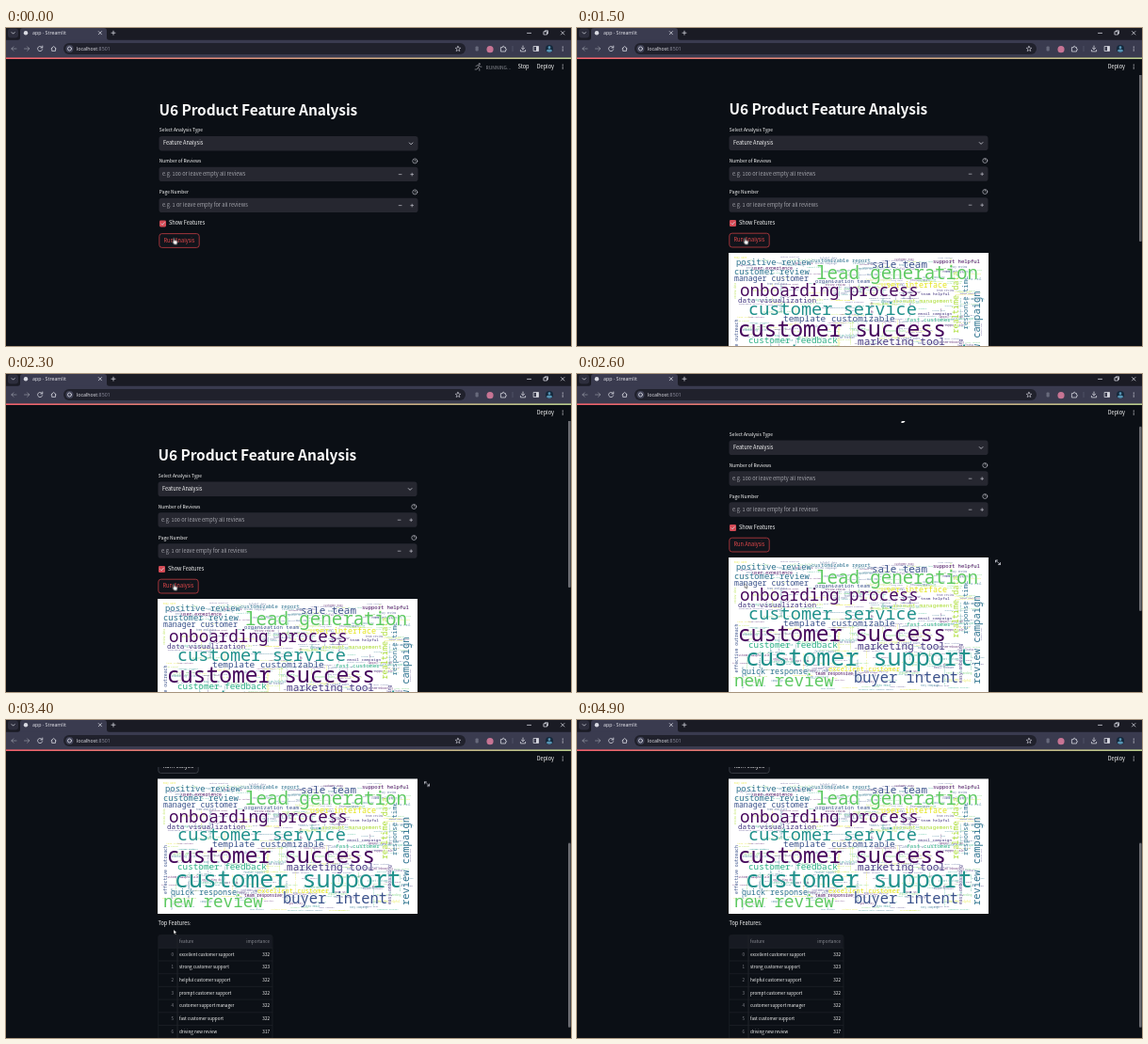
An HTML page that plays this animation: 600x338 px, repeating every 5 s.

```html
<!DOCTYPE html>
<html lang="en">
<head>
<meta charset="utf-8">
<title>Feature Analysis</title>
<style>
html, body { margin: 0; width: 100%; height: 100%; overflow: hidden; background: #0b0f15; }
svg { display: block; width: 600px; height: 338px; }
text { dominant-baseline: central; white-space: pre; }
.app { font-family: "Noto Sans CJK JP", "Noto Sans CJK SC", "Open Sans", sans-serif; fill: #fafafa; }
.ui { font: 5.3px "Open Sans", sans-serif; fill: #e8e8ee; }
.cloud { font-family: "Noto Sans Mono", "DejaVu Sans Mono", monospace; }
.big { stroke: #fff; stroke-width: 1px; paint-order: stroke; }
.title, .label, .body, .cell { transform: translateY(-.09em); }
.title { font-size: 15.45px; font-weight: 700; letter-spacing: -.005em; }
.label { font-size: 4.95px; font-weight: 500; }
.body { font-size: 5.6px; font-weight: 500; }
.cell { font-size: 4.6px; font-weight: 500; }
.line { fill: none; stroke: #d5d6df; stroke-width: .8; stroke-linecap: round; stroke-linejoin: round; }
.dim { opacity: .5; }
.mid { text-anchor: middle; }
.end { text-anchor: end; }

#stage, #shift, .anim { animation: 5s step-end -20ms infinite; }
#stage { animation-name: scroll; }
#page { transform: translateY(calc(var(--s) * -1px)); }
#thumb { transform: translateY(calc(var(--s) * .565px)); }
#shift { animation-name: shift; }
#late, #bar { animation-name: late; }
#bar1, #status { animation-name: running; }
#bar2 { animation-name: done; }
#pose1 { animation-name: pose1; }
#pose2 { animation-name: pose2; }
#hand { animation-name: hand; }
#arrow, #expand { animation-name: arrow; }
#btn { animation-name: btn; }
#btnText { animation-name: btnText; }

/* --s is the scroll distance in pixels */
@keyframes scroll {
  0%, 48% { --s: 0; }
  50% { --s: 12; }
  52% { --s: 44; }
  54% { --s: 80; }
  56% { --s: 113; }
  58% { --s: 140; }
  60% { --s: 159; }
  62% { --s: 170; }
  64% { --s: 175; }
  66%, 100% { --s: 176.5; }
}
@keyframes shift { 0% { transform: translate(1px, .4px); } 14%, 100% { transform: none; } }
@keyframes late { 0% { visibility: hidden; } 14%, 100% { visibility: visible; } }
@keyframes running { 0% { opacity: 1; } 28%, 100% { opacity: 0; } }
@keyframes done { 0% { opacity: 0; } 28%, 100% { opacity: 1; } }
@keyframes pose1 { 0%, 8%, 16%, 24% { opacity: 1; } 4%, 12%, 18%, 100% { opacity: 0; } }
@keyframes pose2 { 0%, 8%, 16%, 24% { opacity: 0; } 4%, 12%, 18%, 100% { opacity: 1; } }
@keyframes hand { 0% { opacity: 1; } 50%, 100% { opacity: 0; } }
@keyframes arrow { 0% { opacity: 0; } 50% { opacity: 1; } 76%, 100% { opacity: 0; } }
@keyframes btn { 0% { stroke: #c23d43; } 64%, 100% { stroke: #41444c; } }
@keyframes btnText { 0% { fill: #e5484b; } 64%, 100% { fill: #fafafa; } }
</style>
</head>
<body>
<svg id="stage" viewBox="0 0 600 338">
  <defs>
    <linearGradient id="deco"><stop stop-color="#f0606a"/><stop offset="1" stop-color="#b9cc8c"/></linearGradient>
    <clipPath id="view"><rect y="50" width="600" height="288"/></clipPath>
  </defs>
  <rect width="600" height="338" fill="#0b0f15"/>

  <g clip-path="url(#view)"><g id="page"><g id="shift" class="app">
    <text class="title" x="161.5" y="86.8">U6 Product Feature Analysis</text>
    <g id="form"></g>
    <rect x="162" y="204" width="7" height="7" rx="1.3" fill="#d44a55"/>
    <path class="line" d="M163.8 207.6l1.3 1.3 2.3-2.7"/>
    <text class="body" x="172" y="207.5">Show Features</text>
    <rect id="btn" class="anim" x="161.8" y="218.2" width="42.4" height="14.8" rx="2.8" fill="#11141b" stroke-width=".8"/>
    <text id="btnText" class="anim body mid" x="183" y="225.7">Run Analysis</text>
    <g id="late" class="anim">
      <rect x="161" y="239" width="276" height="143.5" fill="#fff"/>
      <g id="cloud" class="cloud" transform="translate(0 176.5)"></g>
      <path id="expand" class="anim line" d="M446.5 242h-2v2M447.5 246.6h2v-2M444.7 242.2l1.8 1.8M449.3 246.4l-1.8-1.8"/>
      <text class="body" x="161.5" y="393.5">Top Features:</text>
      <g id="table"></g>
    </g>
  </g></g></g>

  <g class="ui">
    <g id="status" class="anim">
      <g class="line" style="stroke:#8d8f96">
        <g id="pose1" class="anim"><circle cx="502.6" cy="38.2" r=".7"/><path d="M499 40.5l2-1 1.6.5-1.3 2.3 1.5 1v2M501.3 42.3l-1.2 1.7h-2M502.6 40l1 1.2h1.4"/></g>
        <g id="pose2" class="anim"><circle cx="500.6" cy="38.2" r=".7"/><circle cx="501" cy="43" r="2"/><path d="M500.6 39.5v2.3h2.6l1.2 2.8M500.6 40.3h2"/></g>
      </g>
      <text x="509.5" y="41" class="app" style="font-size:5px;fill:#8d8f96">RUNNING...</text>
      <text x="543.5" y="41.3" class="app body">Stop</text>
    </g>
    <text x="563.7" y="41.3" class="app body">Deploy</text>
    <g id="bar" class="anim" clip-path="url(#view)"><g id="thumb" fill="#6b6c72">
      <rect id="bar1" class="anim" x="597" y="31" width="2.6" height="257" rx="1"/>
      <rect id="bar2" class="anim" x="597" y="31" width="2.6" height="196" rx="1"/>
    </g></g>

    <rect width="600" height="14" fill="#1a1b24"/>
    <rect x="2" y=".5" width="11" height="10" rx="3" fill="#2d2e3d"/>
    <path class="line" d="M6 4.6l1.6 1.6 1.6-1.6"/>
    <path d="M12 13q3 0 3-3V3q0-3 3-3h86q3 0 3 3v7q0 3 3 3z" fill="#3a3b4f"/>
    <rect y="12.8" width="600" height="19.2" fill="#3a3b4f"/>
    <circle cx="21" cy="5.3" r="2.2" fill="#d9dae3"/>
    <text x="28" y="5.3">app · Streamlit</text>
    <path class="line" d="M98.3 3.6l3.2 3.2M101.5 3.6l-3.2 3.2M112 5.2h4M114 3.2v4M553.5 5.4h4M571.3 3.8h3.2v3.2h-3.2zM572.4 3.8v-1h3.1V6h-1M589.5 3.6l3.4 3.4M592.9 3.6l-3.4 3.4"/>
    <path class="line dim" d="M11 22H6M8 19.8L5.8 22 8 24.2M19.5 22h5M22.6 19.8l2.2 2.2-2.2 2.2"/>
    <path class="line" d="M38.5 20.8a2.6 2.6 0 1 0 .2 2M38.8 19v2h-2M48 21.8l2.6-2.3 2.6 2.3M48.7 21.5V24.4h3.8V21.5"/>
    <rect x="61" y="16" width="427" height="12" rx="6" fill="#20212c"/>
    <circle cx="67.5" cy="22" r="4" fill="#414357"/>
    <circle class="line" cx="67.5" cy="22" r="2"/>
    <text x="75" y="22">localhost<tspan fill="#8f90a0">:8501</tspan></text>
    <path class="line" d="M480 19.3l.8 1.8 2 .2-1.5 1.3.5 2-1.8-1.1-1.8 1.1.5-2-1.5-1.3 2-.2z" style="stroke-width:.6"/>
    <rect x="498.5" y="19.5" width="3.2" height="5" rx="1" fill="#686a7c"/>
    <circle cx="514" cy="22.7" r="3.6" fill="#c77494"/>
    <path class="line" d="M525.8 20.6h1.5q0-1.4.9-1.4t.9 1.4h1.4v1.5q1 0 1 .8t-1 .8v1.3h-4.7z"/>
    <path d="M538 19v6" stroke="#5b5d72" stroke-width=".7"/>
    <path class="line" d="M549 19v3.6M547.4 21.2l1.6 1.6 1.6-1.6M546.4 23.4v1.5h5.2v-1.5M560.5 19.5h5v5h-5z"/>
    <rect x="563" y="19.5" width="2.5" height="5" fill="#d5d6df"/>
    <circle cx="577" cy="22" r="4" fill="#15293c"/>
    <path d="M574 24.6q0-2 3-2t3 2q-3 2.4-6 0zM575.6 20.7a1.4 1.4 0 1 1 2.8 0a1.4 1.4 0 0 1-2.8 0" fill="#5795b5"/>
    <rect y="31.4" width="600" height="1.6" fill="url(#deco)"/>
    <g id="dots"></g>
  </g>

  <path id="hand" class="anim" transform="translate(176.6 222.6)" d="M1.2.6q.7-.5 1.1.3v2l2.3.6q.9.3.8 1.3l-.5 2.6H2L.2 4.9q-.2-.8.6-.7l.4.4z" fill="#fff" stroke="#111" stroke-width=".4"/>
  <path id="arrow" class="anim" d="M178 222.8v4.6l1.1-1 .8 1.8.8-.4-.8-1.7h1.5z" fill="#fff" stroke="#111" stroke-width=".4"/>
</svg>

<script>
const $ = id => document.getElementById(id);
const add = (id, html) => $(id).insertAdjacentHTML('beforeend', html);
const text = (cls, x, y, s, extra = '') => `<text class="${cls}" x="${x}" y="${y}" ${extra}>${s}</text>`;
const field = y => `<rect x="161.5" y="${y}" width="275" height="15.4" rx="2.8" fill="#262730"/>`;

// Form
add('form', text('label', 161.8, 108, 'Select Analysis Type') + field(114.6) +
  text('body', 166, 122.6, 'Feature Analysis') +
  '<path class="line" d="M427.3 121.6l1.8 1.8 1.8-1.8"/>');
[[141, 'Number of Reviews', 'e.g. 100 or leave empty all reviews'],
 [174, 'Page Number', 'e.g. 1 or leave empty for all reviews']].forEach(([y, name, hint]) => {
  const c = y + 14.2;
  add('form', text('label', 161.8, y, name) + field(y + 6.3) + text('body', 165, c + .3, hint, 'fill="#a3a4ab"') +
    `<circle class="line" cx="433.3" cy="${y}" r="2.5" style="stroke-width:.6"/>` +
    text('label mid', 433.3, y, '?', 'style="font-size:3.6px"') +
    `<path class="line" style="stroke-width:.6" d="M416.2 ${c}h2.8M428.8 ${c}h2.8M430.2 ${c - 1.4}v2.8"/>`);
});

// Table
const rows = [['excellent customer support', 332], ['strong customer support', 323],
  ['helpful customer support', 322], ['prompt customer support', 322],
  ['customer support manager', 322], ['fast customer support', 322],
  ['driving new review', 317], ['responsive support', 312]];
const top0 = 405, rowH = 13.7;
add('table', `<rect x="161.7" y="${top0}" width="121.3" height="140" rx="2.5" fill="#0c1016" stroke="#22252d" stroke-width=".6"/>
  <rect x="162" y="${top0 + .3}" width="120.7" height="13.6" fill="#171a22"/>` +
  text('cell', 184, top0 + 7, 'feature', 'fill="#8b8d95"') +
  text('cell end', 280, top0 + 7, 'importance', 'fill="#8b8d95"'));
rows.forEach(([name, n], i) => {
  const y = top0 + 20.6 + i * rowH;
  add('table', `<path d="M162 ${y - 6.8}h121M182 ${y - 20.5}v27.4" stroke="#22252d" stroke-width=".6"/>` +
    text('cell end', 178, y, i, 'fill="#80828a"') + text('cell', 184, y, name) + text('cell end', 280, y, n));
});

// Word cloud: small seeded filler below, main words above
let seed = 11;
const rnd = () => (seed = seed * 16807 % 2147483647) / 2147483647;
const pick = list => list[Math.floor(rnd() * list.length)];
const tones = ['#46085c', '#453781', '#3b528b', '#2c728e', '#21918c', '#27ad81', '#5ec962', '#aadc32', '#e3e418'];
const parts = ['customer', 'support', 'team', 'review', 'helpful', 'easy', 'email', 'report', 'campaign',
  'feature', 'response', 'onboarding', 'analytics', 'sales', 'data', 'user'];
const word = (s, x, y, width, tone, up) => {
  const size = width / s.length / .6;
  const at = up ? `transform="rotate(-90 ${x} ${y})"` : '';
  return text(size > 4.2 ? 'big' : '', x, y, s, `dy="-.06em" font-size="${size.toFixed(2)}" fill="${tones[tone]}" ${at}`);
};
let filler = '';
for (let i = 0; i < 380; i++) {
  const s = pick(parts) + ' ' + pick(parts), w = s.length * (1.1 + rnd() * .6);
  const tone = Math.floor(rnd() * 9), up = rnd() < .15;
  filler += up ? word(s, 168 + rnd() * 263, 66 + w + rnd() * (136 - w), w, tone, true)
               : word(s, 165 + rnd() * (268 - w), 66 + rnd() * 137, w, tone);
}
add('cloud', `<g opacity=".75">${filler}</g>`);
[['user experience', 186, 79, 43, 0], ['customizable report', 249, 71, 63, 3],
 ['support helpful', 378, 71.5, 50, 0], ['user interface', 323, 96, 70, 8],
 ['organization team', 253, 93, 58, 2], ['account management', 335, 114, 64, 7],
 ['fast customer', 350, 134, 47, 5], ['team helpful', 365, 106, 31, 1],
 ['email campaign', 362, 127, 36, 1], ['excellent customer', 267, 181, 76, 8],
 ['team responsive', 253, 186, 40, 0], ['positive review', 169, 73, 80, 3],
 ['customer review', 167, 83, 80, 3], ['manager customer', 167, 89.5, 79, 2],
 ['data visualization', 171, 113, 83, 1], ['quick response', 175, 183, 70, 3],
 ['realtime data', 402, 148, 66, 7, 1], ['response time', 412, 144, 57, 3, 1],
 ['effective outreach', 169, 185, 52, 2, 1], ['easy onboarding', 407, 196, 42, 1, 1],
 ['review campaign', 425, 197, 94, 3, 1], ['customer feedback', 182, 156, 95, 5],
 ['template customizable', 219, 132.5, 119, 2], ['marketing tool', 298, 156.5, 93, 1],
 ['sale team', 313, 74.5, 59, 2], ['lead generation', 254, 84.3, 172, 6],
 ['onboarding process', 173, 103, 190, 0], ['customer service', 182, 122, 179, 4],
 ['customer success', 171, 144, 221, 0], ['new review', 167, 193.5, 106, 6],
 ['buyer intent', 294, 190.5, 111, 2], ['customer support', 179, 169.5, 241, 4]
].forEach(w => add('cloud', word(...w)));

// Menu dots
const dot = (x, y) => `<circle cx="${x}" cy="${y}" r=".55"/>`;
[22, 41].forEach(y => [-1.9, 0, 1.9].forEach(d => add('dots', dot(591.2, y + d))));
</script>
</body>
</html>
```
